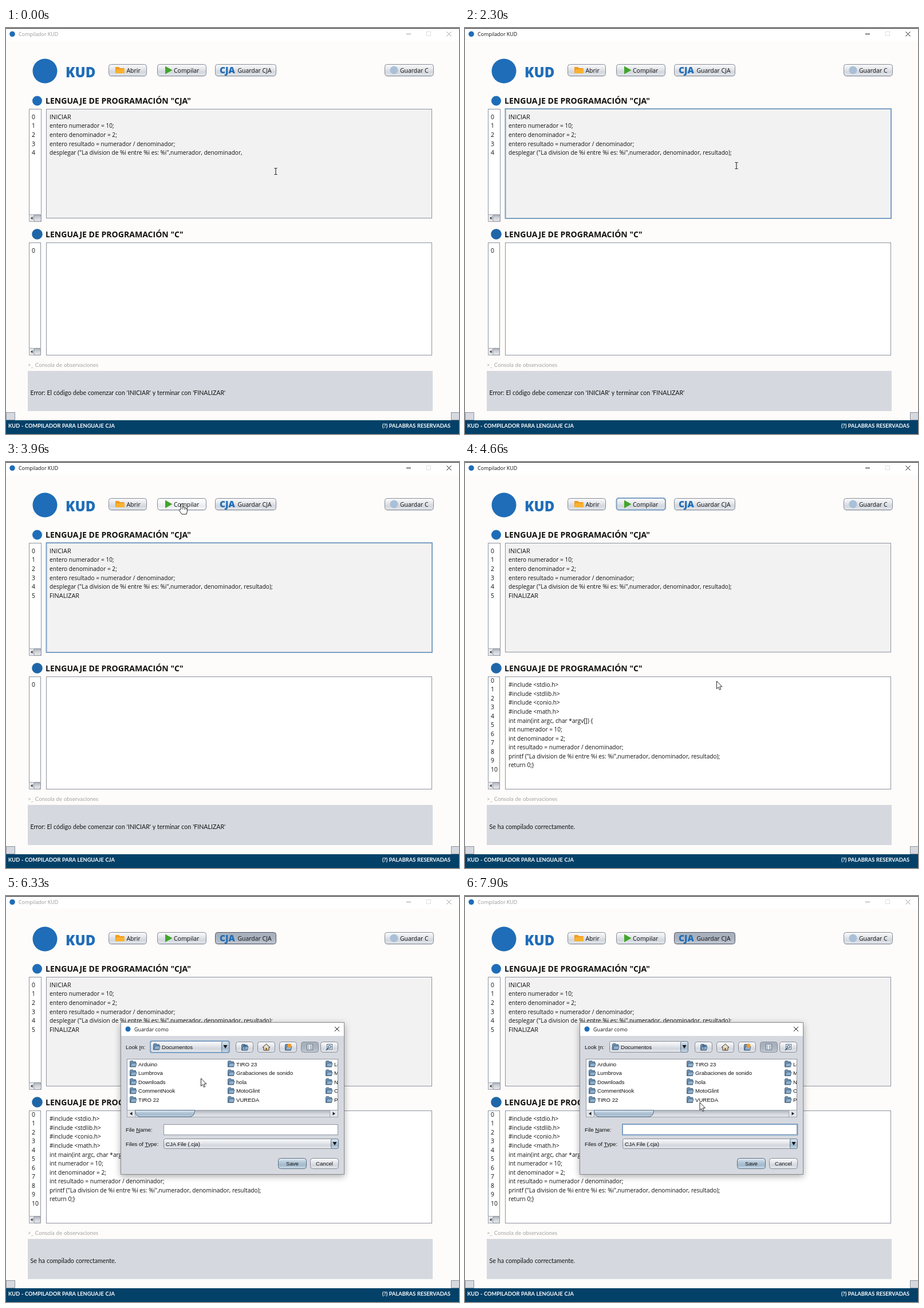
An HTML page that plays this animation: 791 by 708 pixels, repeating every 8 s.

```html
<!DOCTYPE html>
<html lang="es">
<head>
<meta charset="utf-8">
<title>Compilador KUD</title>
<style>
html, body { margin: 0; width: 100%; height: 100%; overflow: hidden; background: #fdfcfa; }
svg { display: block; width: 100vw; height: 100vh; }
text { white-space: pre; fill: #111; }
.ui { font-family: "Open Sans", "Noto Sans", sans-serif; }
.code { font-size: 10.13px; }
.caps { font-size: 10.85px; }
.btn { font-size: 10.45px; }
.bar { font-size: 8.9px; }
.head { font-size: 14.05px; font-weight: 700; }
.note { font-family: Lato, sans-serif; }
.foot { font-size: 9.25px; font-weight: 700; fill: #fff; word-spacing: .4px; }
.dlg { font-family: "Liberation Sans", Arial, sans-serif; font-size: 9.65px; }
</style>
</head>
<body>
<svg id="stage" viewBox="0 0 791 708" xmlns="http://www.w3.org/2000/svg"></svg>
<script>
const LOOP = 8000;
const EDGE = '#8d939e', BLUE = '#1f6db8', FOCUS = '#7b9fc4';

const text = (x, y, s, cls, extra = '') => `<text x="${x}" y="${y}" class="${cls}" ${extra}>${s}</text>`;
// Pixel-aligned bordered box covering x..x2, y..y2
const box = (x, y, x2, y2, fill, edge = EDGE, r = 0, extra = '') =>
  `<rect x="${x + .5}" y="${y + .5}" width="${x2 - x - 1}" height="${y2 - y - 1}" rx="${r}" fill="${fill}" stroke="${edge}" ${extra}/>`;
const dot = (x, y, r, fill) => `<circle cx="${x}" cy="${y}" r="${r}" fill="${fill}"/>`;
const path = (d, fill, extra = '') => `<path d="${d}" fill="${fill}" ${extra}/>`;
const line = (d, color, w = 1) => path(d, 'none', `stroke="${color}" stroke-width="${w}"`);
const grad = (id, ...stops) => `<linearGradient id="${id}" x2="0" y2="1">` +
  stops.map((c, i) => `<stop offset="${i / (stops.length - 1)}" stop-color="${c}"/>`).join('') + '</linearGradient>';
const ring = (id, x, y, x2, y2, r) =>
  `<rect id="${id}" x="${x}" y="${y}" width="${x2 - x}" height="${y2 - y}" rx="${r}" fill="none" stroke="${FOCUS}" stroke-width="2"/>`;

function button(id, x, x2, label, tx) {
  return path(`M${x + 3} 84.5H${x2 - 3}`, 'none', 'stroke="#dcdde0"') +
    box(x, 63, x2, 84, 'url(#up)', '#858c98', 4, `id="${id}"`) + text(tx, 78, label, 'ui btn');
}

function gutter(x2, y, y2) {
  const b = y2 - 13;
  return box(40, y, x2, y2, '#fff') + box(40, b, x2, y2, '#e4e6ea', '#a4a9b2') +
    box(48, b, x2, y2, 'url(#track)', '#8a909b', 3) +
    path(`M43 ${b + 6.5}l3.5 -2.5v5z`, '#333');
}

function folder(x, y) {
  return path(`M${x + .5} ${y - 4}l1 -1.5h4l1 1.5h4v9h-10z`, '#6f93b4', 'stroke="#3d5a76" stroke-width=".9"') +
    path(`M${x + 1.5} ${y + 4.5}l1.500 -6h9l-1.500 6z`, '#8fb0cd', 'stroke="#3d5a76" stroke-width=".8"');
}

function tool(x, icon, fill = 'url(#up)') {
  return box(x, 254, x + 31, 273, fill, '#858c98', 4) + icon;
}

function combo(x, y, x2, y2, label, tx) {
  return box(x, y, x2, y2, 'url(#up)', '#858c98', 3) +
    box(x2 - 14, y, x2, y2, 'url(#blue)', '#5f7890', 3) +
    path(`M${x2 - 10.5} ${(y + y2) / 2 - 3}h7l-3.5 6z`, '#111') +
    text(tx, (y + y2) / 2 + 3.7, label, 'dlg');
}

function dialog() {
  const names = [
    ['Arduino', 'Lumbrova', 'Downloads', 'CommentNook', 'TIRO 22'],
    ['TIRO 23', 'Grabaciones de sonido', 'hola', 'MotoGlint', 'VUREDA'],
    ['Le', 'M', 'N', 'O', 'P']
  ];
  const files = names.map((col, c) => col.map((s, r) => {
    const x = 216 + 171 * c, y = 293 + 15.55 * r;
    return folder(x, y) + text(x + 15, y + 3.6, s, 'dlg');
  }).join('')).join('');
  const u = s => `<tspan text-decoration="underline">${s}</tspan>`;
  return `<g filter="url(#shadow)">${box(200, 220, 591, 486, '#d6d9df', '#85888d')}</g>` +
    '<rect x="201" y="221" width="389" height="23" fill="#fff"/>' +
    dot(213, 232, 4.5, BLUE) + text(224, 235.5, 'Guardar como', 'ui bar') +
    line('M574 228l8 8m0 -8l-8 8', '#111') +
    text(209, 267, `Look ${u('I')}n:`, 'dlg') +
    combo(252, 253, 390, 273, 'Documentos', 272) + folder(257, 263) +
    ring('comboFocus', 252, 253, 390, 273, 3) +
    tool(401, folder(411, 264) + line('M417 267v-8m-3 3l3 -3l3 3', '#1f4f80')) +
    tool(439, path('M448 264l6.5 -6l6.5 6h-2v5h-9v-5z', '#e8dfc8', 'stroke="#333"') + '<rect x="453" y="265" width="3" height="4" fill="#a06a28"/>') +
    tool(477, folder(487, 264) + dot(495, 261, 3.5, '#f39a2b')) +
    tool(515, box(525, 258, 536, 269, '#e9edf2', '#697684') + line('M527 261.5h2m2 0h3m-7 2.5h2m2 0h3m-7 2.5h2m2 0h3', '#53677b'), 'url(#down)') +
    tool(549, box(560, 258, 570, 268, '#eef2f6', '#5b7084') + '<circle cx="565" cy="263" r="2.5" fill="#c5d6e5" stroke="#34516c"/>' + line('M563 265l-4 4', '#34516c', 1.5)) +
    box(211, 284, 580, 386, '#fff') + `<g clip-path="url(#files)">${files}</g>` +
    box(211, 373, 580, 386, 'url(#track)', '#a0a5ae') +
    box(211, 373, 226, 386, '#e2e5e9', '#a0a5ae') + box(565, 373, 580, 386, '#e2e5e9', '#a0a5ae') +
    path('M216 379.5l4.5 -3v6z', '#222') + path('M575 379.5l-4.5 -3v6z', '#222') +
    path('M225.5 373.5H329.5C329.5 381 326 385 320 385H235C229 385 225.5 381 225.5 373.5z', 'url(#blue)', 'stroke="#4d6a86"') +
    text(209, 411, `File ${u('N')}ame:`, 'dlg') + box(275, 398, 580, 417, '#fff') +
    ring('fieldFocus', 275, 398, 580.5, 416.5, 0) +
    '<rect id="fieldCaret" x="278" y="401" width="1" height="12" fill="#111"/>' +
    text(209, 436, `Files of ${u('T')}ype:`, 'dlg') +
    combo(275, 423, 581, 441, 'CJA File (.cja)', 279) +
    box(475, 457, 525, 476, 'url(#blue)', '#5a6f84', 4) + text(500, 470.3, 'Save', 'dlg', 'text-anchor="middle"') +
    box(531, 457, 581, 476, 'url(#up)', '#858c98', 4) + text(556, 470.3, 'Cancel', 'dlg', 'text-anchor="middle"');
}

const source = ['INICIAR', 'entero numerador = 10;', 'entero denominador = 2;',
  'entero resultado = numerador / denominador;'];
const callArgs = '("La division de %i entre %i es: %i",numerador, denominador,';
const output = ['#include &lt;stdio.h&gt;', '#include &lt;stdlib.h&gt;', '#include &lt;conio.h&gt;', '#include &lt;math.h&gt;',
  'int main(int argc, char *argv[]) {', 'int numerador = 10;', 'int denominador = 2;',
  'int resultado = numerador / denominador;', `printf ${callArgs} resultado);`, 'return 0;}'];
const rowY = i => 158.7 + 15.6 * i;
const digits = (n, y, step) => Array.from({ length: n }, (_, i) => text(45, y + step * i, i, 'ui btn')).join('');

const stage = document.getElementById('stage');
stage.innerHTML = '<defs>' +
  grad('up', '#fbfbfc', '#e9ebee', '#d3d7de', '#e6e9ed') +
  grad('over', '#ffffff', '#f7f8fa', '#e8ebef', '#fafbfc') +
  grad('down', '#a9b1bd', '#a7b0bd', '#b0b8c4', '#c4cbd5') +
  grad('blue', '#e4edf5', '#b9cbdb', '#a2b8cc', '#cfdeea') +
  grad('track', '#a9afb9', '#d2d5db', '#e6e8ec') +
  '<filter id="shadow" x="-10%" y="-10%" width="120%" height="125%"><feDropShadow dx="0" dy="3" stdDeviation="6" flood-opacity=".33"/></filter>' +
  '<clipPath id="files"><rect x="212" y="285" width="367" height="88"/></clipPath>' +
  '<clipPath id="rows"><rect x="41" y="376" width="19" height="181"/></clipPath></defs>' +
  '<rect width="791" height="708" fill="#fdfcfa"/><rect width="791" height="22" fill="#fff"/><rect width="791" height="1" fill="#15171a"/>' +
  dot(11, 10.5, 4.8, BLUE) + text(22, 14, 'Compilador KUD', 'ui bar', 'id="title"') +
  '<g id="winKeys" fill="none">' + line('M699 10.5h8', 'currentColor') + line('M769.5 6.5l8 8m0 -8l-8 8', 'currentColor') + '</g>' +
  '<rect x="734.5" y="6.5" width="7" height="7" fill="none" stroke="#dedede"/>' +
  dot(68, 75, 21.5, BLUE) + text(104, 86, 'KUD', 'ui', `style="font-size:24px;font-weight:800;fill:${BLUE}"`) +
  button('open', 179, 246, 'Abrir', 210.5) +
  path('M191 68h6l2 2h7.5v9h-15.5z', '#f39a1e') + path('M191 79l2 -7h14l-.5 7z', '#fbb22f') +
  button('compile', 264, 350, 'Compilar', 293) + path('M278 66.5l12.5 7l-12.5 7z', '#41a62a') +
  ring('compileFocus', 264.5, 63, 350, 83.5, 4) +
  button('save', 365, 472, 'Guardar CJA', 404.5) +
  text(373, 79, 'CJA', 'ui', `style="font-size:15.5px;font-weight:800;fill:${BLUE}"`) +
  button('saveC', 661, 747, 'Guardar C', 688) + dot(677.5, 73.5, 7, '#a9c0d8') +
  dot(54.5, 127, 8.5, BLUE) + text(69, 131.5, 'LENGUAJE DE PROGRAMACIÓN "CJA"', 'ui head') +
  dot(54.5, 359.5, 9.3, '#1f66a8') + text(69, 364.5, 'LENGUAJE DE PROGRAMACIÓN "C"', 'ui head') +
  gutter(62, 141, 338) + digits(5, 158.7, 15.6) + text(45, rowY(5), '5', 'ui btn', 'id="five"') +
  box(70, 141, 744, 332, '#f2f2f2') + ring('areaFocus', 70.5, 141, 744, 332, 0) +
  source.map((s, i) => text(76, rowY(i), s, 'ui ' + (i ? 'code' : 'caps'))).join('') +
  text(76, rowY(4), '', 'ui code', 'id="call"') + text(76, rowY(5), '', 'ui caps', 'id="final"') +
  '<rect id="caret" width="1" height="14" fill="#111"/>' +
  gutter(61, 374, 571) + box(70, 374, 744, 571, '#fff') +
  text(45, 392.2, '0', 'ui btn', 'id="zero"') +
  '<g id="result"><g clip-path="url(#rows)">' + digits(11, 384.5, 15.55) + '</g>' +
  output.map((s, i) => text(76, 392.3 + 15.55 * i, s, 'ui code')).join('') + '</g>' +
  text(38, 590.8, '&gt;_ Consola de observaciones', 'note', 'style="font-size:9.65px;fill:#a3a3a3;word-spacing:.4px"') +
  '<rect x="38" y="598" width="707" height="70" fill="#d5d9df"/>' +
  text(42.5, 639.5, '', 'note', 'id="message" style="font-size:10.6px;word-spacing:.3px"') +
  box(0, 670, 16, 684, '#d6d9df') + box(777, 670, 792, 684, '#d6d9df') +
  '<rect y="684" width="791" height="24" fill="#044168"/>' +
  text(4, 697, 'KUD - COMPILADOR PARA LENGUAJE CJA', 'note foot') +
  text(776, 697, '(?) PALABRAS RESERVADAS', 'note foot', 'text-anchor="end"') +
  `<g id="dialog">${dialog()}</g>` +
  '<g id="pointer">' +
  '<g id="beam">' + line('M-2.5 -5.5h2l.5 .5l.5 -.5h2M0 -5V5M-2.5 5.5h2l.5 -.5l.5 .5h2', '#111') + '</g>' +
  '<g id="arrow">' + path('M0 0V13.5l3 -2.8l2 4.6l2.2 -1l-2 -4.5h4.3z', '#fff', 'stroke="#111" stroke-width=".9"') + '</g>' +
  '<g id="hand">' + path('M-1.5 9V1C-1.5 -.8 1.5 -.8 1.5 1V6.5L2 5.5C4 5 4.5 6 4.5 7C6.5 6 7 7 7 8C9 7.5 9.5 8.5 9.5 10V13L8 18H0L-4.5 11.5C-5 9.5 -3.5 9 -2.5 10.5z', '#fff', 'stroke="#111" stroke-width=".9"') +
  line('M1.5 6.5v3m3 -2v2.5m2.5 -1.5v2', '#111', .8) + '</g></g>';

const el = {};
stage.querySelectorAll('[id]').forEach(n => el[n.id] = n);
const show = (id, on) => el[id].style.display = on ? '' : 'none';
const skin = (id, state) => {
  el[id].setAttribute('fill', `url(#${state})`);
  el[id].setAttribute('stroke', state === 'down' ? '#4f5763' : '#858c98');
};
const within = (t, spans) => spans.some(([a, b]) => t >= a && t < b);
const typed = (s, times, t) => s.slice(0, times.filter(k => t >= k).length);

const keysCall = [300, 460, 560, 660, 760, 860, 960, 1060, 1160, 1260, 1630, 1760];
const keysFinal = [2460, 2560, 2730, 2830, 2930, 3030, 3130, 3230, 3330];
const caretOn = [[300, 1460], [1630, 1930], [2100, 2300], [2360, 3500], [3670, 3830]];
const moves = [[0, 471, 250], [30, 471, 250], [290, 474, 240], [3330, 474, 240], [3530, 335, 108],
  [3800, 307, 73], [4240, 307, 73], [4580, 439.5, 382], [4700, 439.5, 382], [4920, 380, 100],
  [5130, 425, 80], [6150, 425, 80], [6320, 340.5, 318], [6700, 340.5, 318], [6960, 330, 406],
  [7100, 330, 406], [7540, 410, 360], [LOOP, 410, 360]];

function pointerAt(t) {
  const i = moves.findIndex(m => m[0] > t);
  const [t0, x0, y0] = moves[i - 1], [t1, x1, y1] = moves[i];
  const p = (t - t0) / (t1 - t0), e = p * p * (3 - 2 * p);
  return [x0 + (x1 - x0) * e, y0 + (y1 - y0) * e];
}

function draw(t) {
  const active = t >= 130 && t < 6230, compiled = t >= 4200, open = t >= 6260;
  el.title.style.fill = active ? '#111' : '#999';
  el.winKeys.style.color = active ? '#111' : '#999';

  el.call.textContent = 'desplegar ' + callArgs + typed(' resultado);', keysCall, t);
  el.final.textContent = typed('FINALIZAR', keysFinal, t);
  const last = t >= 2360;
  show('five', last);
  show('areaFocus', t >= 130 && t < 4130);
  show('caret', within(t, caretOn));
  const row = last ? el.final : el.call;
  el.caret.setAttribute('x', Math.round(76 + row.getComputedTextLength()));
  el.caret.setAttribute('y', last ? 225 : 209);

  show('zero', !compiled);
  show('result', compiled);
  el.message.textContent = compiled ? 'Se ha compilado correctamente.'
    : "Error: El código debe comenzar con 'INICIAR' y terminar con 'FINALIZAR'";

  const [x, y] = pointerAt(t);
  const over = (a, b, c, d) => x >= a && x < c && y >= b && y < d;
  const onCompile = !open && over(264, 63, 350, 84), onSave = !open && over(365, 63, 472, 84);
  skin('compile', within(t, [[4100, 4200]]) ? 'down' : onCompile ? 'over' : 'up');
  skin('save', t >= 6130 ? 'down' : onSave ? 'over' : 'up');
  show('compileFocus', t >= 4130 && t < 6230);

  show('dialog', open);
  show('comboFocus', t < 7000);
  show('fieldFocus', t >= 7000);
  show('fieldCaret', within(t, [[7000, 7170], [7340, 7540], [7730, 7900]]));

  const beam = open ? over(275, 398, 580, 417) : over(70, 141, 744, 332);
  const hand = onCompile || onSave;
  show('beam', beam);
  show('hand', hand);
  show('arrow', !beam && !hand);
  el.pointer.setAttribute('transform', `translate(${x.toFixed(1)} ${y.toFixed(1)})`);
}

function tick(now) {
  draw(now % LOOP);
  requestAnimationFrame(tick);
}
draw(0);
requestAnimationFrame(tick);
</script>
</body>
</html>
```
